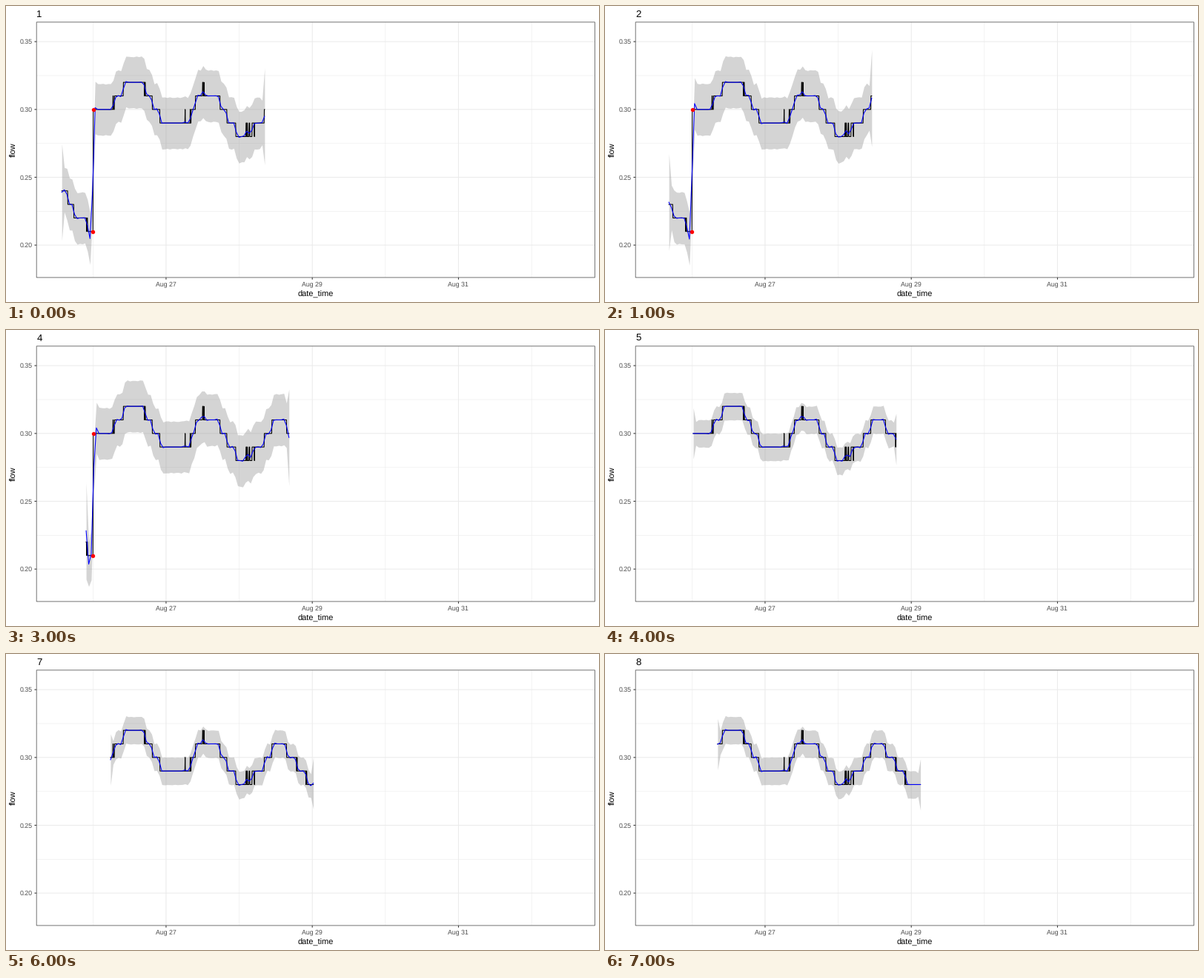
Recreate the animation shown at these times as a matplotlib script. Size 800 by 400 pixels, loop 8 s.

```python
import matplotlib.pyplot as plt
import numpy as np
from matplotlib.animation import FuncAnimation
from matplotlib.patches import Rectangle

plt.rcParams["font.family"] = "Liberation Sans"
plt.rcParams["text.hinting"] = "none"

W, H, DPI = 800, 400, 100
PX = 72 / DPI                       # points per pixel
LEFT, RIGHT, TOP, BOTTOM = 41.2, 794.4, 21.8, 366.9
DAY = 98.63                         # pixels per day

WINDOW, SHIFT, FRAMES = 800, 32, 8  # samples
X0, DX = 75.2, 0.3425               # first sample and spacing in pixels
NEAR = 40                           # neighbours in each local fit
GRID = 80                           # points on the smooth curve
JUMP = 117.4                        # x of the sudden rise

# turning points of the flow, joined by cosine easing
TURNS = [(74, .24), (103, .218), (JUMP - .01, .2115), (JUMP, .301),
         (134, .301), (173, .322), (222, .2875), (240.5, .2946),
         (246, .293), (264, .3143), (272, .3146), (316, .2837),
         (326, .2846), (333, .2848), (367, .308), (424, .277), (430, .277)]


def to_y(v):
    return 139.8 - (np.asarray(v) - .30) * 1833


def make_flow():
    """Eased daily swing plus sensor noise, read to two decimals."""
    x = X0 + DX * np.arange(WINDOW + SHIFT * (FRAMES - 1))
    tx, tv = np.array(TURNS).T
    i = np.searchsorted(tx, x, side="right") - 1
    t = (x - tx[i]) / (tx[i + 1] - tx[i])
    level = tv[i] + (tv[i + 1] - tv[i]) * (1 - np.cos(np.pi * t)) / 2
    noise = np.random.default_rng(4).normal(0, .0006, x.size // 3 + 1)
    return x, np.round(level + np.repeat(noise, 3)[:x.size], 2)


def loess(x, v):
    """Local quadratic fit with tricube weights, and its relative error."""
    at = np.linspace(x[0], x[-1], GRID)
    fit, err = np.empty(GRID), np.empty(GRID)
    for i, c in enumerate(at):
        dist = np.abs(x - c)
        near = np.argsort(dist, kind="stable")[:NEAR]
        h = dist[near].max() * 1.001
        u = (x[near] - c) / h
        w = (1 - np.abs(u) ** 3) ** 3
        basis = np.vander(u, 3, increasing=True)
        row = np.linalg.solve(basis.T @ (w[:, None] * basis), basis.T * w)[0]
        fit[i] = row @ v[near]
        err[i] = np.sqrt(row @ row)
    err /= np.median(err)
    # error dips slightly between interpolation nodes
    phase = np.arange(GRID) * 128 / (GRID - 1)
    return at, fit, err * (1.015 - .03 * np.sin(np.pi * phase) ** 2)


fig = plt.figure(figsize=(W / DPI, H / DPI), dpi=DPI, facecolor="white")
ax = fig.add_axes([0, 0, 1, 1])
ax.set_xlim(0, W)
ax.set_ylim(H, 0)
ax.axis("off")


def rule(xs, ys, color, width):
    ax.plot(xs, ys, color=color, lw=width * PX, zorder=1, snap=False,
            solid_capstyle="butt")


def label(x, y, s, size, color="black", **kw):
    return ax.text(x, y, s, fontsize=size * PX, color=color,
                   va="baseline", **kw)


for k in range(7):
    x = 117.3 + k * DAY
    major = k % 2 == 1
    rule([x, x], [TOP, BOTTOM], "0.92", 1.07 if major else .55)
    if major:
        rule([x, x], [BOTTOM, BOTTOM + 2.75], "0.2", 1.07)
        label(x - .2, 379.2, f"Aug {26 + k}", 8.8, "0.3", ha="center")

for k in range(7):
    v = .20 + k * .025
    y = to_y(v)
    major = k % 2 == 0
    rule([LEFT, RIGHT], [y, y], "0.92", 1.07 if major else .55)
    if major:
        rule([LEFT - 2.75, LEFT], [y, y], "0.2", 1.07)
        label(36.2, y + 3.1, f"{v:.2f}", 8.8, "0.3", ha="right")

ax.add_patch(Rectangle((LEFT, TOP), RIGHT - LEFT, BOTTOM - TOP, fill=False,
                       ec="0.4", lw=.9 * PX, zorder=6, snap=False))
label(417.7, 392.8, "date_time", 11, ha="center")
label(13.6, 194.4, "flow", 11, ha="center", rotation=90,
      rotation_mode="anchor")
title = label(41.2, 15.3, "", 13.2)

band = ax.fill_between([0, 1], 0, 1, color="0.6", alpha=.42, lw=0, zorder=2)
raw, = ax.plot([], [], color="black", lw=1.07 * PX, zorder=3)
smooth, = ax.plot([], [], color="blue", lw=1.07 * PX, zorder=4)
dots, = ax.plot([], [], "o", color="red", ms=5.4 * PX, mew=0, zorder=5)

xs, flow = make_flow()


def draw(n):
    part = slice(n * SHIFT, n * SHIFT + WINDOW)
    x, v = xs[part], flow[part]
    at, fit, err = loess(x, v)
    y = to_y(fit)
    jump_inside = x[0] < JUMP
    half = (34.8 if jump_inside else 18.5) * err

    title.set_text(str(n + 1))
    raw.set_data(x, to_y(v))
    smooth.set_data(at, y)
    band.set_verts([np.column_stack([np.r_[at, at[::-1]],
                                     np.r_[y - half, (y + half)[::-1]]])])
    dots.set_data([JUMP - .5, JUMP + .5], to_y([.21, .30]))
    dots.set_visible(jump_inside)
    return title, raw, smooth, band, dots


anim = FuncAnimation(fig, draw, frames=FRAMES, interval=1000, repeat=True,
                     repeat_delay=0, blit=False)
plt.show()
```
